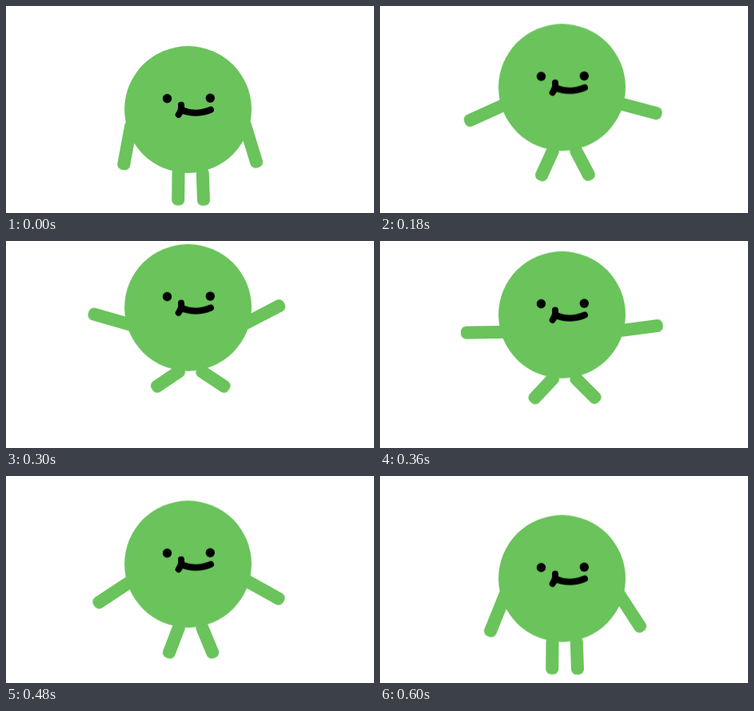
An HTML page without scripts for the animation above (0.63 s loop, 460 by 259 pixels).

```html
<!DOCTYPE html>
<html lang="en">
<head>
<meta charset="utf-8">
<title>Jumping blob</title>
<style>
  html, body { margin: 0; width: 100%; height: 100%; overflow: hidden; background: #fff; }
  svg { display: block; width: 460px; height: 259px; }

  .blob, .limb {
    animation: 630ms -3ms infinite;
    fill: #6ac35b;
  }
  .blob { animation-name: jump; }
  .limb { animation-name: swing; transform-origin: 0 0; }
  .face { fill: #000; }
  .mouth { fill: none; stroke: #000; stroke-width: 8; stroke-linecap: round; stroke-linejoin: round; }

  /* 21 poses of 30 ms: ten up, ten down, one held */
  @keyframes jump {
    0% { transform: translateY(0); animation-timing-function: steps(10); }
    47.619% { transform: translateY(-46.2px); animation-timing-function: steps(10); }
    95.238%, 100% { transform: translateY(-1.3px); animation-timing-function: step-end; }
  }
  @keyframes swing {
    0% { transform: rotate(var(--rest)); animation-timing-function: steps(4); }
    19.0476% { transform: rotate(var(--lift)); animation-timing-function: steps(4); }
    38.0952% { transform: rotate(var(--rise)); animation-timing-function: steps(2); }
    47.619% { transform: rotate(var(--peak)); animation-timing-function: steps(2); }
    57.1429% { transform: rotate(var(--fall)); animation-timing-function: steps(4); }
    76.1905% { transform: rotate(var(--drop)); animation-timing-function: steps(4); }
    95.2381%, 100% { transform: rotate(var(--land)); animation-timing-function: step-end; }
  }

  .left.arm {
    --rest: 10.5deg; --lift: 46deg; --rise: 85deg; --peak: 106deg;
    --fall: 89deg; --drop: 56.5deg; --land: 22deg;
  }
  .right.arm {
    --rest: -17deg; --lift: -54.5deg; --rise: -95.5deg; --peak: -117.5deg;
    --fall: -97.5deg; --drop: -61deg; --land: -33deg;
  }
  .left.leg {
    --rest: 0.5deg; --lift: 13deg; --rise: 36deg; --peak: 56deg;
    --fall: 43deg; --drop: 21deg; --land: 0.5deg;
  }
  .right.leg {
    --rest: -2deg; --lift: -16deg; --rise: -39.5deg; --peak: -56.5deg;
    --fall: -45deg; --drop: -22.5deg; --land: -2deg;
  }
</style>
</head>
<body>
<svg viewBox="0 0 460 259">
  <g class="blob">
    <g transform="translate(156 151)"><rect class="limb left arm" x="-8" y="-8" width="16" height="63" rx="6.5"/></g>
    <g transform="translate(299 149.5)"><rect class="limb right arm" x="-8" y="-8" width="16" height="63" rx="6.5"/></g>
    <g transform="translate(215.5 210)"><rect class="limb left leg" x="-8" y="-8" width="16" height="47.5" rx="6.5"/></g>
    <g transform="translate(245.8 210.3)"><rect class="limb right leg" x="-8" y="-8" width="16" height="47.5" rx="6.5"/></g>
    <circle cx="227.5" cy="129.5" r="79.4"/>
    <g class="face">
      <circle cx="201.5" cy="115.7" r="5.7"/>
      <circle cx="255.3" cy="115.2" r="5.7"/>
      <path class="mouth" d="M219 123.7Q220 130 215.7 136M219 130Q237 137.5 256 129.7"/>
    </g>
  </g>
</svg>
</body>
</html>
```
